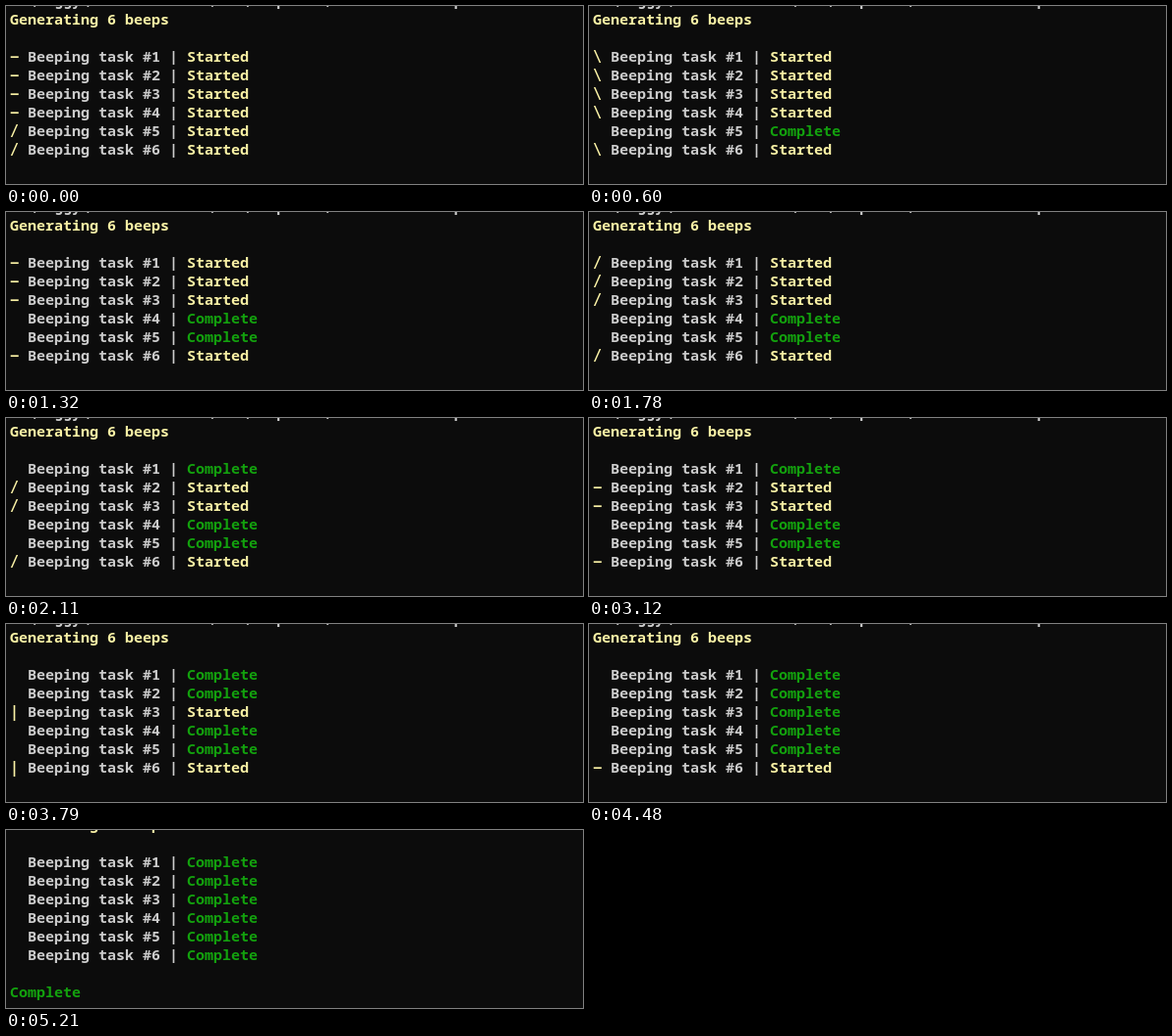
An HTML page with a canvas that plays this animation: 587 px wide and 182 px high, repeating every 5280 ms.

```html
<!DOCTYPE html>
<html lang="en">
<head>
<meta charset="utf-8">
<title>Beeping tasks</title>
<style>
  html, body { margin: 0; width: 100%; height: 100%; overflow: hidden; background: #0c0c0c; }
  canvas { display: block; }
</style>
</head>
<body>
<canvas id="terminal" width="587" height="182"></canvas>
<script>
const ctx = document.getElementById('terminal').getContext('2d');
const BACKGROUND = '#0c0c0c', GREY = '#cccccc', YELLOW = '#f9f1a5', GREEN = '#13a10e';
const TEXT_FONT = '600 15px "Noto Sans Mono", monospace';
const SYMBOL_FONT = 'bold 15px "DejaVu Sans Mono", monospace';
const LEFT = 4, CELL = 9, LINE = 19;
const LOOP = 5280, FINISH = 5210;
const SPINNER = '−\\|/', TICK = 109.4, REPAINT = 60;
const PROMPT = 'C:\\Buggy\\SourceFolders\\src\\beepTask\\tasks> run beep';

// One beep at a time, in this order of tasks.
const ORDER = [5, 4, 1, 2, 3, 6], BEEP = 1034;
const completeAt = task => FINISH - BEEP * (ORDER.length - 1 - ORDER.indexOf(task));

function write(text, column, row, color, font = TEXT_FONT) {
  ctx.font = font;
  ctx.fillStyle = color;
  ctx.fillText(text, LEFT + column * CELL, row * LINE);
}

function spinnerAt(time, task) {
  // Rows are rewritten from the top down, each slightly after the one above.
  const painted = Math.floor(time / REPAINT) * REPAINT;
  const tick = Math.floor((painted + 10 - 3 * (task - 1)) / TICK);
  return SPINNER[(tick + SPINNER.length) % SPINNER.length];
}

function draw(time) {
  const finished = time >= FINISH;
  const scroll = finished ? 1 : 0;
  ctx.fillStyle = BACKGROUND;
  ctx.fillRect(0, 0, 587, 182);

  write(PROMPT, 0, -scroll, GREY, SYMBOL_FONT);
  write('Generating 6 beeps', 0, 1 - scroll, YELLOW);
  for (let task = 1; task <= ORDER.length; task++) {
    const row = task + 2 - scroll;
    const complete = time >= completeAt(task);
    if (!complete) write(spinnerAt(time, task), 0, row, YELLOW, SYMBOL_FONT);
    write(`Beeping task #${task} |`, 2, row, GREY);
    write(complete ? 'Complete' : 'Started', 20, row, complete ? GREEN : YELLOW);
  }
  if (finished) write('Complete', 0, 9, GREEN);
}

const start = performance.now();
function frame() {
  draw((performance.now() - start) % LOOP);
  requestAnimationFrame(frame);
}
frame();
</script>
</body>
</html>
```
